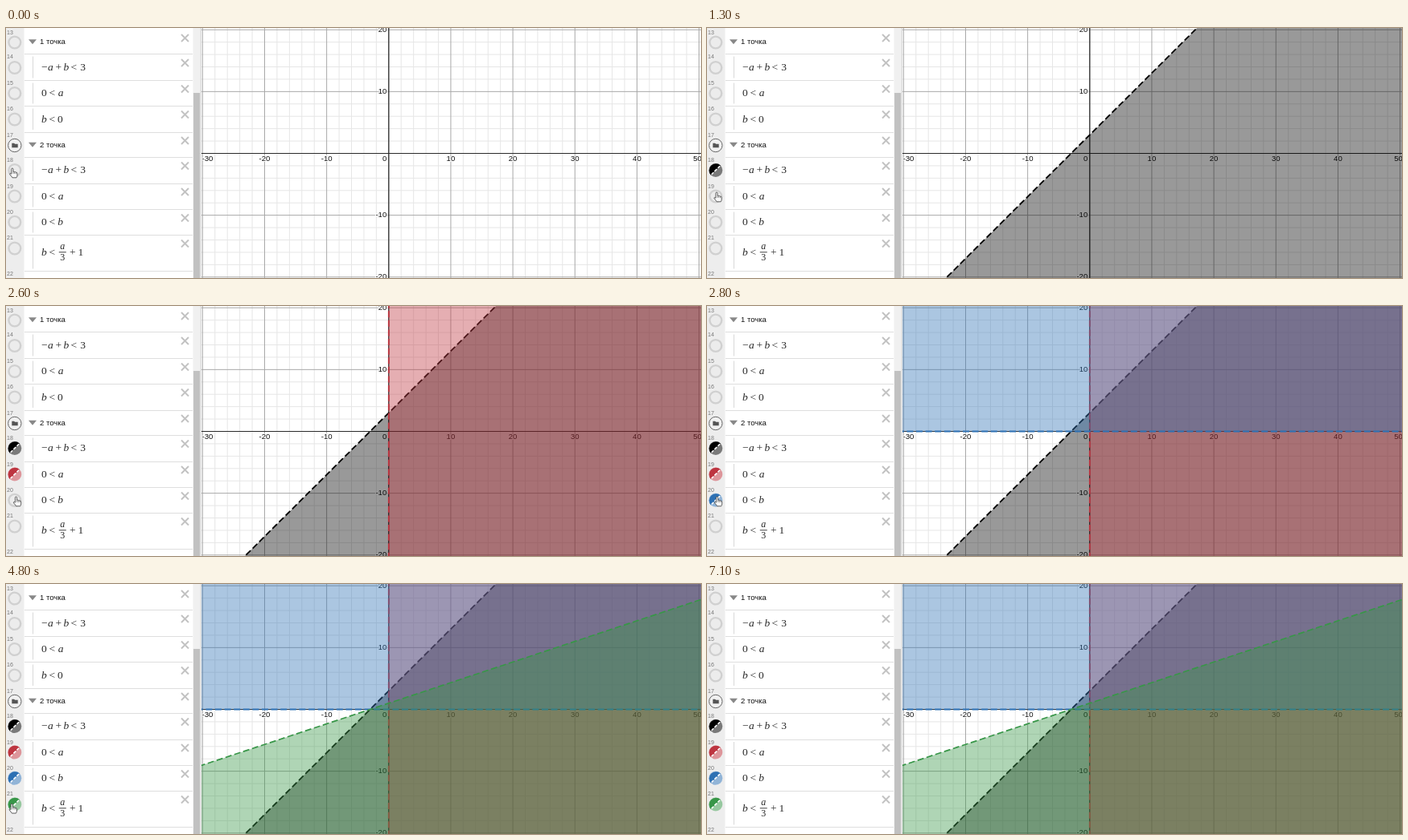
An HTML page for the animation above (8400 ms loop, 864 px wide and 312 px high).

```html
<!DOCTYPE html>
<html lang="ru">
<head>
<meta charset="utf-8">
<title>Неравенства</title>
<style>
html, body { margin: 0; width: 100%; height: 100%; overflow: hidden; background: #fff; }
svg { display: block; width: 864px; height: 312px; }
text { font-family: "Liberation Sans", Arial, sans-serif; fill: #111; }
.num { font-size: 7px; fill: #777; }
.title { font-size: 9.5px; }
.tick { font-size: 9.6px; stroke: #fff; stroke-width: 2px; paint-order: stroke; }
.math { font: 13.5px "Liberation Serif", "Times New Roman", serif; fill: #2a2a2a; }
.small { font-size: 12px; }
.var { font-style: italic; }
</style>
</head>
<body>
<svg id="stage" viewBox="0 0 864 312">
  <clipPath id="plotClip"><rect x="243" y="0" width="621" height="312"/></clipPath>
  <g id="plot" clip-path="url(#plotClip)"></g>
  <g id="panel"></g>
  <g id="hand">
    <path d="M-2.6 1.2V-4.8Q-2.6-6-1.5-6T-.4-4.8V-1.6Q.4-2.2 1.3-1.4Q2.2-1.8 3-.9Q4.7-1.2 4.7.7V2.8Q4.7 4.4 3.7 5.8H-1.4Q-2.6 3.8-4.5 1.8Q-5 .5-3.8.5Z"
      fill="#f8f8f8" stroke="#3a3a3a" stroke-width=".8" stroke-linejoin="round"/>
    <path d="M-.4-1.6V1M1.3-1.2V1M3-.7V1.2" fill="none" stroke="#555" stroke-width=".6"/>
  </g>
</svg>
<script>
const LOOP = 8400, STEP = 100;
const NS = 'http://www.w3.org/2000/svg';
const plot = document.getElementById('plot');
const panel = document.getElementById('panel');
const hand = document.getElementById('hand');

function add(parent, tag, attrs = {}, content) {
  const el = document.createElementNS(NS, tag);
  for (const key in attrs) el.setAttribute(key, attrs[key]);
  if (content !== undefined) el.textContent = content;
  return parent.appendChild(el);
}
const line = (parent, x1, y1, x2, y2, stroke, width = 1) =>
  add(parent, 'path', { d: `M${x1} ${y1}L${x2} ${y2}`, stroke, 'stroke-width': width, fill: 'none' });
const rect = (parent, x, y, width, height, fill) =>
  add(parent, 'rect', { x, y, width, height, fill });
const label = (parent, x, y, cls, text, anchor = 'start') =>
  add(parent, 'text', { x, y, class: cls, 'text-anchor': anchor }, text);

// Plot coordinates
const UNIT = 7.715;
const px = a => 475.8 + a * UNIT;
const py = b => 156.5 - b * UNIT;

function drawGrid() {
  rect(plot, 243, 0, 621, 312, '#fff');
  for (const major of [false, true]) {
    const color = major ? '#a8a8a8' : '#e6e6e6';
    for (let n = -30; n <= 50; n += 2) {
      if ((n % 10 === 0) !== major) continue;
      line(plot, px(n), 0, px(n), 312, color);
      if (Math.abs(n) <= 20) line(plot, 243, py(n), 864, py(n), color);
    }
  }
  line(plot, px(0), 0, px(0), 312, '#2a2a2a', 1.2);
  line(plot, 243, py(0), 864, py(0), '#2a2a2a', 1.2);
  for (let n = -30; n <= 50; n += 10) {
    if (n) label(plot, Math.min(Math.max(px(n), 250.5), 859.5), 166.2, 'tick', n, 'middle');
    if (n && Math.abs(n) <= 20) label(plot, 473.3, py(n) + 2.6, 'tick', n, 'end');
  }
  label(plot, 473.3, 166.2, 'tick', 0, 'end');
}

// Each region: boundary from (a1,b1) to (a2,b2), closed by a far side
const regions = [
  { color: '#000000', y: 177.5, on: 200, edge: [[-40, -37], [60, 63]], far: [[60, -40], [-40, -40]], width: 1.8 },
  { color: '#bd3540', y: 210, on: 1400, edge: [[0, 30], [0, -30]], far: [[60, -30], [60, 30]], width: 1.8 },
  { color: '#2d70b3', y: 242.3, on: 2800, edge: [[-40, 0], [60, 0]], far: [[60, 30], [-40, 30]], width: 1.8 },
  { color: '#389648', y: 275, on: 4800, edge: [[-42, -13], [60, 21]], far: [[60, -40], [-42, -40]], width: 1.7 }
];

function drawRegion(r) {
  const path = pts => 'M' + pts.map(([a, b]) => `${px(a)} ${py(b)}`).join('L');
  const area = add(plot, 'g');
  add(area, 'path', { d: path([...r.edge, ...r.far]) + 'Z', fill: r.color, 'fill-opacity': .4 });
  add(area, 'path', { d: path(r.edge), stroke: r.color, 'stroke-width': r.width, 'stroke-dasharray': '8 3.6', fill: 'none' });

  const icon = add(panel, 'g', { transform: `translate(10.8 ${r.y})` });
  add(icon, 'circle', { r: 9, fill: '#ededed' });
  add(icon, 'circle', { r: 8.5, fill: '#fff' });
  add(icon, 'circle', { r: 8.5, fill: r.color, 'fill-opacity': .52 });
  add(icon, 'path', { d: 'M-6 6A8.5 8.5 0 0 1 6-6Z', fill: r.color });
  add(icon, 'path', { d: 'M-5.2 5.2L-2.7 2.7M-1.4 1.4L1.4-1.4M2.7-2.7L5.2-5.2', stroke: '#fff', 'stroke-width': 1.6 });
  r.parts = [area, icon];
}

// Math tokens: [x, glyph]
const lineRule = [[44, '−'], [52, 'a'], [61.5, '+'], [71.5, 'b'], [80.5, '<'], [92.3, '3']];
const posA = [[44, '0'], [53.5, '<'], [64.7, 'a']];
const posB = [[44, '0'], [53.5, '<'], [64.2, 'b']];
const negB = [[44, 'b'], [53.5, '<'], [64, '0']];
const frac = [[44, 'b'], [53.5, '<'], [79, '+'], [89.5, '1']];
const rows = [
  { top: 0, dot: 18, close: 12.5, title: '1 точка' },
  { top: 32.5, dot: 49.5, close: 43.5, math: lineRule },
  { top: 65.5, dot: 81.5, close: 76, math: posA },
  { top: 97.5, dot: 114, close: 108, math: negB },
  { top: 130, dot: 146.5, close: 140.5, title: '2 точка', folder: true },
  { top: 161.5, dot: 177.5, close: 172, math: lineRule },
  { top: 194, dot: 210, close: 204.5, math: posA },
  { top: 226.5, dot: 242.3, close: 237, math: posB },
  { top: 258.5, dot: 275, close: 269, math: frac },
  { top: 303.5 }
];

function token(x, y, glyph, size = '') {
  label(panel, x, y, `math ${size} ${/[ab]/.test(glyph) ? 'var' : ''}`, glyph);
}

function drawRow(r, i) {
  const next = rows[i + 1];
  if (i) line(panel, 23, Math.floor(r.top) + .5, 232, Math.floor(r.top) + .5, '#dedede');
  label(panel, 1, i === 9 ? 309.3 : Math.max(r.top + 5.8, 7.8), 'num', 13 + i);
  if (!next) return;

  if (r.folder) {
    add(panel, 'circle', { cx: 10.8, cy: r.dot, r: 8.2, fill: '#f1f1f1', stroke: '#666', 'stroke-width': 1 });
    add(panel, 'path', { d: `M7.3 ${r.dot - 2.8}h2.8l1 1h3.6v4.6h-7.4z`, fill: '#555' });
  } else {
    add(panel, 'circle', { cx: 10.8, cy: r.dot, r: 7.4, fill: '#ececec', stroke: '#d0d0d0', 'stroke-width': 2.4 });
  }
  add(panel, 'path', { d: `M218 ${r.close - 4.5}l9 9m0-9l-9 9`, stroke: '#c2c2c2', 'stroke-width': 1.9 });

  if (r.title) {
    add(panel, 'path', { d: `M28 ${r.dot - 3.8}h10l-5 6z`, fill: '#888' });
    label(panel, 42, r.dot + 2.1, 'title', r.title);
    return;
  }
  line(panel, 33.5, r.top + 3, 33.5, next.top - 3, '#d8d8d8');
  const base = r.math === frac ? 284 : r.dot + 3.9;
  for (const [x, glyph] of r.math) token(x, base, glyph);
  if (r.math === frac) {
    token(67.2, 276, 'a', 'small');
    line(panel, 65.8, 279.8, 74.8, 279.8, '#2a2a2a', .9);
    token(67.2, 290, '3', 'small');
  }
}

function drawPanel() {
  rect(panel, 0, 0, 243, 312, '#fff');
  rect(panel, 0, 0, 22.5, 312, '#ededed');
  rect(panel, 232.5, 0, 9, 312, '#f0f0f0');
  rect(panel, 233, 81, 8, 231, '#c1c1c1');
  rect(panel, 241.5, 0, 1.5, 312, '#dcdcdc');
  rows.forEach(drawRow);
}

// Pointer stops: [time, x, y]
const stops = [
  [0, 9.3, 181], [500, 9.3, 181], [1300, 13.5, 211], [1500, 13.5, 211],
  [2400, 14, 244], [3900, 14, 244], [4500, 8.7, 280.3], [5900, 8.7, 280.3],
  [6300, 5, 190], [6800, 19, 24], [7100, 34, 24]
];
const HIDE = 7100;

function pointerAt(t) {
  const i = Math.max(1, stops.findIndex(s => s[0] >= t));
  const [t0, x0, y0] = stops[i - 1], [t1, x1, y1] = stops[i];
  const p = (t - t0) / (t1 - t0), k = p * p * (3 - 2 * p);
  return [x0 + (x1 - x0) * k, y0 + (y1 - y0) * k];
}

function render(time) {
  const t = Math.floor(time % LOOP / STEP) * STEP;
  for (const r of regions)
    for (const part of r.parts) part.style.display = t >= r.on ? '' : 'none';
  const shown = t < HIDE;
  hand.style.display = shown ? '' : 'none';
  if (shown) hand.setAttribute('transform', `translate(${pointerAt(t)})`);
}

drawGrid();
drawPanel();
regions.forEach(drawRegion);

const start = performance.now();
function frame() {
  render(performance.now() - start);
  requestAnimationFrame(frame);
}
frame();
</script>
</body>
</html>
```
